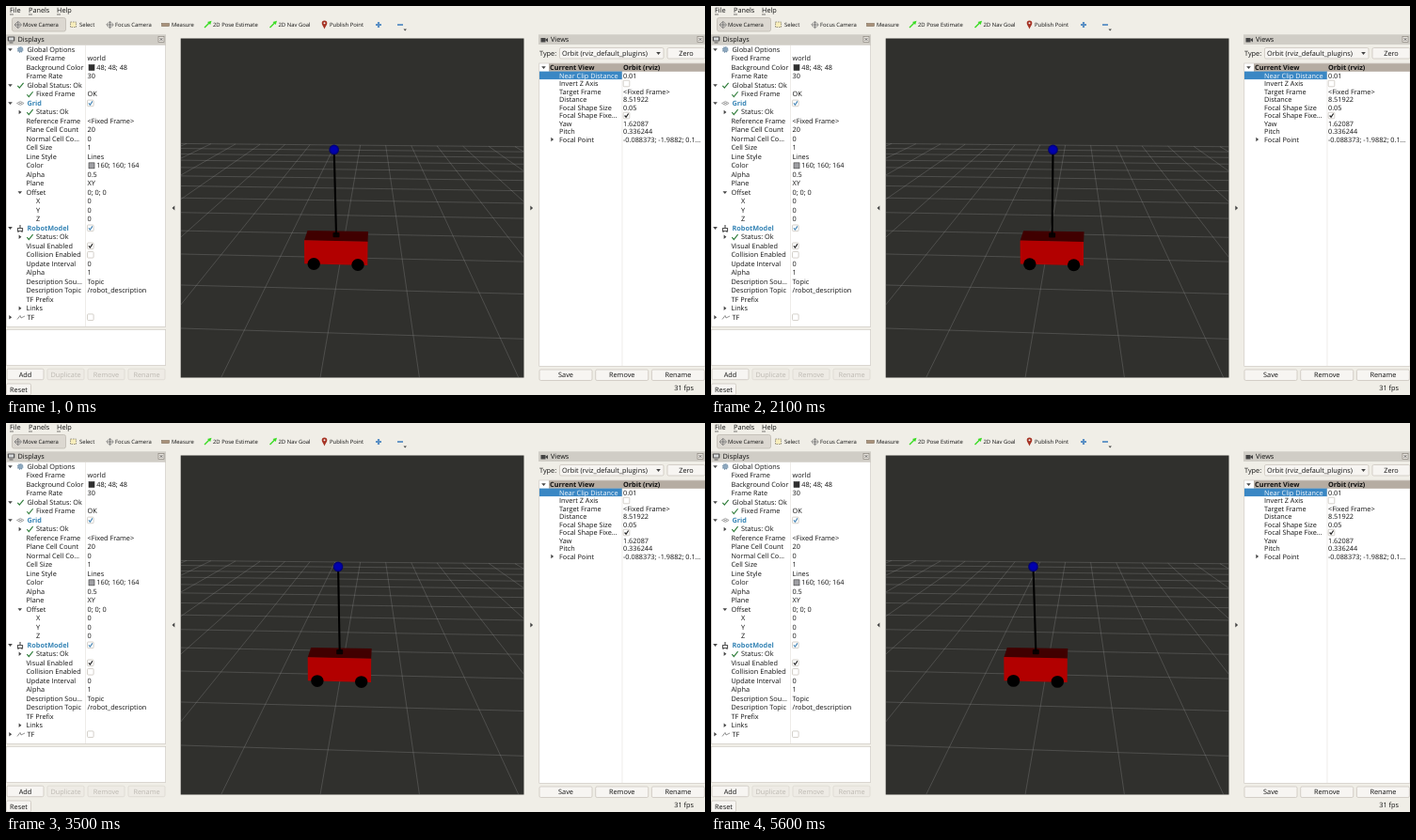
Write an HTML page that moves like this. It is 743 px wide and 414 px high and loops after 5700 ms.

```html
<!DOCTYPE html>
<html lang="en">
<meta charset="utf-8">
<title>Robot viewer</title>
<style>
html, body { margin: 0; width: 743px; height: 414px; overflow: hidden; background: #f0eee7; }
svg { display: block; }
text { font: 500 7.3px "Open Sans", "Noto Sans", sans-serif; fill: #111; text-rendering: geometricPrecision; white-space: pre; }
.tool { font-size: 5.9px; }
.bold { font-weight: 700; }
.blue { font-weight: 700; fill: #3584b5; }
.off { fill: #bcb8b1; }
.light { fill: #f4f8fc; }
</style>
<svg id="stage" width="743" height="414" viewBox="0 0 743 414"></svg>
<script>
const stage = document.getElementById('stage');
let out = '';
const add = s => out += s;
const rect = (x, y, w, h, fill, extra = '') =>
  add(`<rect x="${x}" y="${y}" width="${w}" height="${h}" fill="${fill}" ${extra}/>`);
const path = (d, stroke, width = 1, fill = 'none') =>
  add(`<path d="${d}" fill="${fill}" stroke="${stroke}" stroke-width="${width}"/>`);
const text = (x, y, s, cls = '', anchor = 'start') =>
  add(`<text x="${x}" y="${y}" class="${cls}" text-anchor="${anchor}">${s.replace(/</g, '&lt;')}</text>`);
const shape = (d, fill) => path(d, 'none', 0, fill);
const dot = (x, y, r, fill) => add(`<circle cx="${x}" cy="${y}" r="${r}" fill="${fill}"/>`);

function button(x, y, w, h, label, cls = '') {
  rect(x + .5, y + .5, w - 1, h - 1, cls ? '#eeebe5' : '#f7f5f2', `rx="1.5" stroke="${cls ? '#dad6cf' : '#c6c1b8'}" stroke-width=".7"`);
  text(x + w / 2, y + h / 2 + 2.6, label, cls, 'middle');
}
function arrow(x, y, open) {
  shape(open ? `M${x - 2.3} ${y - 1.2}h4.6l-2.3 2.8z` : `M${x - 1.2} ${y - 2.3}v4.6l2.8-2.3z`, '#444');
}
const tick = (x, y) => path(`M${x - 3} ${y + .3}l2 2.4l4.3-5.4`, '#2f7d3a', 1.15);
function checkbox(x, y, on, color = '#222') {
  rect(x - 3.3, y - 3.3, 6.6, 6.6, '#fff', 'rx="1" stroke="#c3beb5" stroke-width=".7"');
  if (on) path(`M${x - 1.9} ${y}l1.5 1.8l2.5-3.8`, color, 1.2);
}
function closeBox(x, y) {
  rect(x - 3, y - 3, 6, 6, '#e6e2dc', 'stroke="#8b867e" stroke-width=".7"');
  path(`M${x - 1.4} ${y - 1.4}l2.8 2.8m0-2.8l-2.8 2.8`, '#555', .8);
}
// Four-way move arrows
function cross(x, y) {
  path(`M${x - 3} ${y}h6M${x} ${y - 3}v6`, '#777', 1);
  path(`M${x} ${y - 3.8}l3.800 3.800l-3.800 3.800l-3.800-3.800z`, '#777', .8);
}

function menuAndTools() {
  [['File', 4], ['Panels', 24], ['Help', 54]].forEach(([s, x]) => {
    text(x, 7.4, s);
    path(`M${x} 9h4`, '#222', .6);
  });
  rect(6.5, 12.5, 57, 14.5, '#dcd8d1', 'rx="2" stroke="#bfbab1" stroke-width=".8"');
  [['Move Camera', 18], ['Select', 78], ['Focus Camera', 116], ['Measure', 176],
   ['2D Pose Estimate', 220], ['2D Nav Goal', 289.5], ['Publish Point', 344]]
    .forEach(([s, x]) => text(x, 22.3, s, 'tool'));
  cross(12.8, 20);
  cross(110.5, 20);
  rect(68.5, 17, 6, 5.5, '#f7edbb', 'stroke="#807b6c" stroke-width=".8" stroke-dasharray="1.5 1"');
  rect(165.5, 18.5, 8, 3, '#a8917a', 'stroke="#74624f" stroke-width=".5"');
  [211, 280.5].forEach(x => {
    path(`M${x} 23l5-5`, '#3bdc25', 1.5);
    shape(`M${x + 3} 17l4.5-1.2l-1.3 4.3z`, '#3bdc25');
  });
  shape('M338.5 24.5C337 21 335.7 20 335.7 18.2A2.8 2.8 0 0 1 341.3 18.2C341.3 20 340 21 338.5 24.5z', '#a63324');
  dot(338.5, 18.2, 1, '#eee');
  path('M393 20h6M396 17v6', '#5a8fc4', 2.2);
  path('M416 20h6', '#5a8fc4', 1.8);
  shape('M422.5 24.5h3.4l-1.7 2z', '#444');
}

// label, value, indent level, arrow (1 open, 0 closed), style
const displays = [
  ['Global Options', '', 0, 1], ['Fixed Frame', 'world'], ['Background Color', '48; 48; 48'], ['Frame Rate', '30'],
  ['Global Status: Ok', '', 0, 1], ['Fixed Frame', 'OK', 2], ['Grid', 'on', 0, 1, 'blue'], ['Status: Ok', '', 2, 0],
  ['Reference Frame', '<Fixed Frame>'], ['Plane Cell Count', '20'], ['Normal Cell Co…', '0'], ['Cell Size', '1'],
  ['Line Style', 'Lines'], ['Color', '160; 160; 164'], ['Alpha', '0.5'], ['Plane', 'XY'], ['Offset', '0; 0; 0', 1, 1],
  ['X', '0', 2], ['Y', '0', 2], ['Z', '0', 2], ['RobotModel', 'on', 0, 1, 'blue'], ['Status: Ok', '', 2, 0],
  ['Visual Enabled', 'ON'], ['Collision Enabled', 'off'], ['Update Interval', '0'], ['Alpha', '1'],
  ['Description Sou…', 'Topic'], ['Description Topic', '/robot_description'], ['TF Prefix', ''],
  ['Links', '', 1, 0], ['TF', 'off', 0, 0]
];

function displaysPanel() {
  rect(0, 30.3, 170, 10.7, '#d0cdc6');
  rect(1.8, 32.5, 7.5, 5, '#555', 'rx=".7"');
  rect(3, 33.5, 5, 3, '#d5d8d9');
  path('M3.5 39h4', '#555', 1);
  text(12.5, 38.4, 'Displays');
  closeBox(165, 35.5);
  rect(.3, 41.3, 169.4, 300, '#fff', 'stroke="#c9c4bc" stroke-width=".6"');
  path('M84.5 42v299', '#e3e0db', .6);
  displays.forEach(([label, value, level = 1, open, cls = ''], i) => {
    const y = 46.5 + i * 9.49;
    if (open !== undefined) arrow(level ? 14.8 : 4.5, y, open);
    text([22.5, 21.5, 32][level], y + 2.5, label, cls);
    if (label.startsWith('Status') || i === 5) tick(25.3, y);
    if (/^(on|off)$/i.test(value)) checkbox(89.8, y, value !== 'off', value === 'on' ? '#4a89b7' : '#222');
    else {
      const swatch = i === 2 ? '#303030' : i === 13 ? '#a0a0a4' : '';
      if (swatch) rect(88, y - 3, 6, 6, swatch, 'stroke="#333" stroke-width=".6"');
      text(swatch ? 96.3 : 86.5, y + 2.5, value);
    }
  });
  dot(15.2, 46.4, 2.6, '#8fa9bf');
  add('<circle cx="15.2" cy="46.4" r="2.7" fill="none" stroke="#6786a0" stroke-width="1.2" stroke-dasharray="1.1 1"/>');
  tick(15.3, 84.5);
  path('M11.5 103.5l3.8-2l3.8 2l-3.8 2zM13.4 102.5l3.8 2M17.2 102.5l-3.8 2', '#888', .7);
  path('M15 233v3M12.5 236.5h5v3h-5zM13 240v1M17 240v1', '#555', 1.2);
  path('M12 333.5l3-4l1 2.5l4-2', '#777', .8);
  rect(.3, 344.3, 169.4, 38, '#fff', 'stroke="#c9c4bc" stroke-width=".6"');
  ['Add', 'Duplicate', 'Remove', 'Rename'].forEach((s, i) =>
    button(.5 + i * 43, 385.7, 40, 12.5, s, i ? 'off' : ''));
  button(0, 401.5, 27, 13, 'Reset');
}

const views = [
  ['Current View', 'Orbit (rviz)'], ['Near Clip Distance', '0.01'], ['Invert Z Axis', 'off'],
  ['Target Frame', '<Fixed Frame>'], ['Distance', '8.51922'], ['Focal Shape Size', '0.05'],
  ['Focal Shape Fixe…', 'on'], ['Yaw', '1.62087'], ['Pitch', '0.336244'],
  ['Focal Point', '-0.088373; -1.9882; 0.1…']
];

function viewsPanel() {
  rect(566, 30.3, 177, 10.7, '#d0cdc6');
  rect(568.5, 34, 5, 4.5, '#444');
  shape('M573 36l3-2v4.5z', '#444');
  text(579, 38.4, 'Views');
  closeBox(738, 35.5);
  text(567, 52.8, 'Type:');
  button(588, 44, 111.5, 12.5, '');
  text(591, 52.8, 'Orbit (rviz_default_plugins)');
  arrow(693.5, 50.3, 1);
  button(702.5, 44, 41, 12.5, 'Zero');
  rect(566.8, 61, 176.2, 322.3, '#fff', 'stroke="#c9c4bc" stroke-width=".6"');
  rect(577, 61.2, 166, 8.6, '#b5aca2');
  rect(567, 69.6, 88, 8.5, '#3a87c4');
  path('M655 70v313', '#e3e0db', .6);
  views.forEach(([label, value], i) => {
    const y = 65.5 + i * 8.5, cls = i ? '' : 'bold';
    text(i ? 588 : 578, y + 2.6, label, i === 1 ? 'light' : cls);
    if (/^(on|off)$/.test(value)) checkbox(659.5, y, value === 'on');
    else text(656, y + 2.6, value, cls);
  });
  arrow(571.5, 65.5, 1);
  arrow(580.5, 142, 0);
  ['Save', 'Remove', 'Rename'].forEach((s, i) => button(566.5 + i * 59.7, 386.5, 57, 12.5, s));
  text(731, 408.6, '31 fps', '', 'end');
}

// Orbit camera: ground point to screen
const yaw = 1.62087, pitch = .336244, dist = 8.51922;
const { sin, cos } = Math;
const eye = [-.088373 + dist * cos(yaw) * cos(pitch), -1.9882 + dist * sin(yaw) * cos(pitch), .17 + dist * sin(pitch)];
function project(x, y) {
  const dx = x - eye[0], dy = y - eye[1], dz = -eye[2];
  const along = dx * cos(yaw) + dy * sin(yaw);
  const depth = -along * cos(pitch) - dz * sin(pitch);
  const up = -along * sin(pitch) + dz * cos(pitch);
  const right = -dx * sin(yaw) + dy * cos(yaw);
  const f = 180 / Math.tan(Math.PI / 8);
  return `${(368.2 + f * right / depth).toFixed(2)} ${(215 - f * up / depth).toFixed(2)}`;
}

function scene() {
  add('<clipPath id="view"><rect x="185.7" y="34.4" width="364.8" height="361"/></clipPath>');
  add('<radialGradient id="shade"><stop offset=".55" stop-color="#0000b0"/><stop offset="1" stop-color="#000068"/></radialGradient>');
  add('<g clip-path="url(#view)">');
  rect(185, 34, 366, 362, '#30302d');
  let d = '';
  for (let i = -10; i <= 10; i++) {
    d += `M${project(i, -10)}L${project(i, 4)}`;
    if (i < 4) d += `M${project(-10, i)}L${project(10, i)}`;
  }
  add(`<path d="${d}" fill="none" stroke="#a0a0a0" stroke-opacity=".45" stroke-width=".6"/>`);
  add('<g id="cart">');
  shape('M-30.5 239L34 240L33.5 251L-34 249.500z', '#400000');
  shape('M-34 249.200L33.5 250.700L33.3 276L-33.8 274.300z', '#b20000');
  add('<ellipse cx="-23.8" cy="274.5" rx="6.7" ry="6.4"/><ellipse cx="23" cy="275.5" rx="6.7" ry="6.4"/>');
  rect(-3.5, 241, 7, 5.3, '#080000', 'rx="1"');
  add('</g><path id="pole" stroke="#000" stroke-width="2.1"/><circle id="ball" cy="152.9" r="5.3" fill="url(#shade)"/></g>');
  shape('M179.3 212.5v5l-2.800-2.500z', '#444');
  shape('M557.3 212.5v5l2.800-2.500z', '#444');
}

menuAndTools();
displaysPanel();
scene();
viewsPanel();
stage.innerHTML = out;

// time, cart x, ball x
const keys = [[0, 351, 348.7], [1400, 360.2, 360.4], [2100, 362.6, 363.5], [2900, 357.6, 356.4],
  [4100, 352.2, 350.4], [4800, 350.4, 348.5], [5600, 345.3, 342.5]];

function slope(i, c) {
  const a = keys[Math.max(i - 1, 0)], b = keys[Math.min(i + 1, keys.length - 1)];
  return (b[c] - a[c]) / (b[0] - a[0]);
}
function sample(t, c) {
  const i = Math.max(0, keys.findIndex(k => k[0] >= t) - 1);
  const a = keys[i], b = keys[i + 1], h = b[0] - a[0], u = (t - a[0]) / h, v = 1 - u;
  return v * v * (1 + 2 * u) * a[c] + u * u * (3 - 2 * u) * b[c]
    + h * u * v * (v * slope(i, c) - u * slope(i + 1, c));
}

const [cart, pole, ball] = ['cart', 'pole', 'ball'].map(id => document.getElementById(id));
function draw() {
  const t = Math.floor(performance.now() % 5700 / 100) * 100;
  const x = sample(t, 1), top = sample(t, 2), y = (x - 351) * .02;
  cart.setAttribute('transform', `translate(${x} ${y})`);
  pole.setAttribute('d', `M${x} ${243 + y}L${top} 153`);
  ball.setAttribute('cx', top);
  requestAnimationFrame(draw);
}
draw();
</script>
</html>
```
